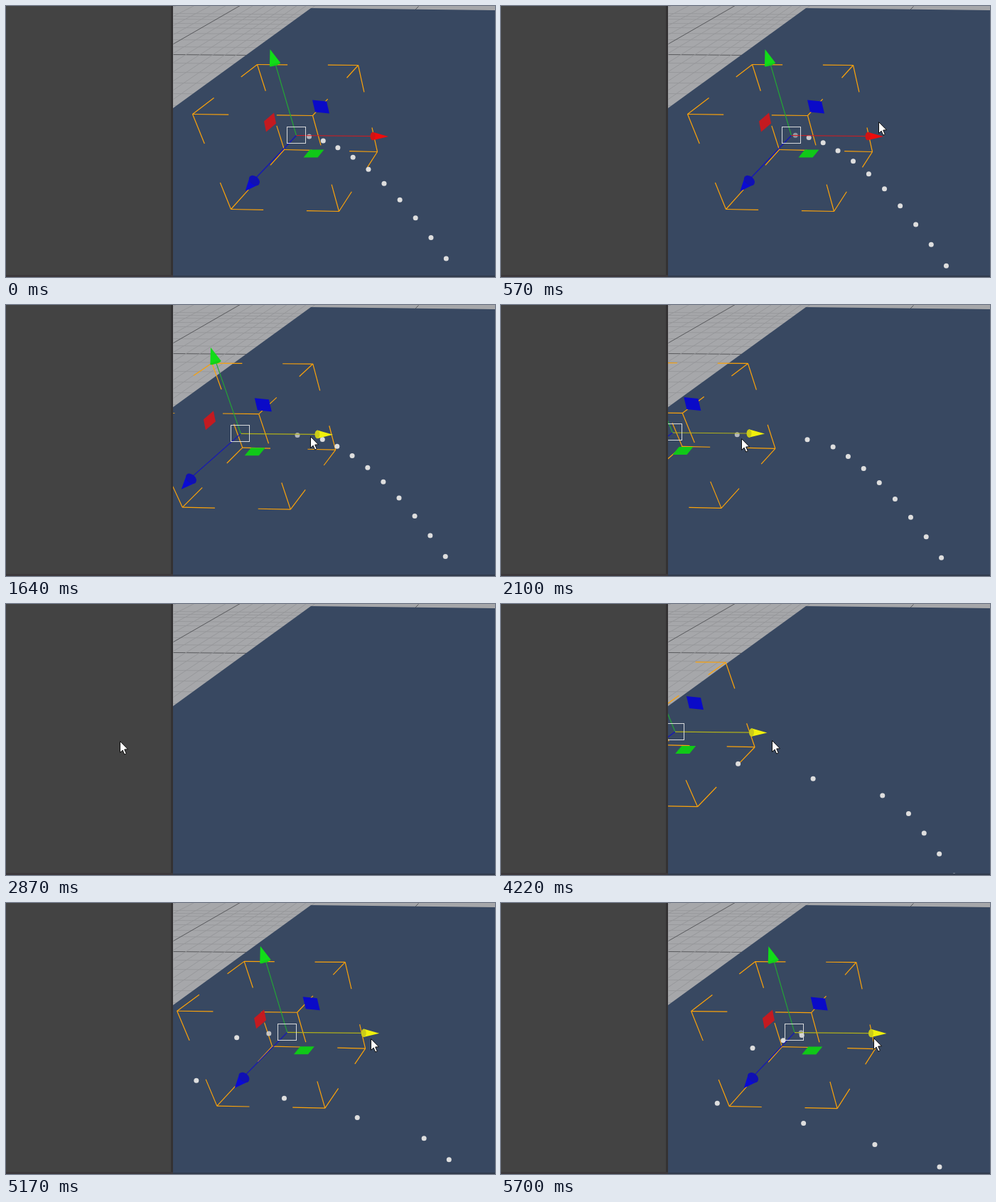
Write an HTML page with a canvas that moves like this. It is 688 px wide and 382 px high and loops after 5730 ms.

```html
<!DOCTYPE html>
<html lang="en">
<head>
<meta charset="utf-8">
<title>Particle emitter</title>
<style>
html, body { margin: 0; width: 100%; height: 100%; overflow: hidden; background: #434343; }
canvas { display: block; width: 688px; height: 382px; }
</style>
</head>
<body>
<canvas id="stage" width="688" height="382"></canvas>
<script>
const ctx = document.getElementById('stage').getContext('2d');
const LOOP = 5730, STEP = 1000 / 24, STEPS = 137;
const HIDE = [2870, 3630];
const GRAB = 24;
const LEAD = 1.6, LAG = 1.5;
const HOME = { x: 408, y: 182 };

// Gizmo x at a few steps: drag out, hold, drag back.
const drag = [[29, 408], [50, 241], [60, 149], [69, 49], [87, 49], [101, 244.5], [103, 274], [116, 358.5], [128, 412.5]];

const clamp = (v, lo, hi) => Math.min(hi, Math.max(lo, v));

// Smooth curve through the points that never overshoots.
function curve(keys, k) {
  const last = keys.length - 1;
  k = clamp(k, keys[0][0], keys[last][0]);
  const secant = i => (keys[i + 1][1] - keys[i][1]) / (keys[i + 1][0] - keys[i][0]);
  const slope = i => {
    const a = secant(Math.max(i - 1, 0)), b = secant(Math.min(i, last - 1));
    return a * b > 0 ? 2 * a * b / (a + b) : 0;
  };
  let i = 0;
  while (i < last - 1 && k > keys[i + 1][0]) i++;
  const h = keys[i + 1][0] - keys[i][0], f = (k - keys[i][0]) / h, g = 1 - f;
  return keys[i][1] * g * g * (1 + 2 * f) + keys[i + 1][1] * f * f * (3 - 2 * f)
    + h * f * g * (g * slope(i) - f * slope(i + 1));
}

const centerX = k => curve(drag, k);
const centerY = x => HOME.y + (x - HOME.x) * .015;

// Simulation clock in emission intervals, and the step of each birth.
const INTERVALS = 13.53;
const drift = p => .1 * Math.sin(2 * Math.PI * p);
const simTime = k => INTERVALS * k / STEPS + drift(k / STEPS) - 3;
const birthStep = n => (n + 3 - drift((n + 3) / INTERVALS)) / INTERVALS * STEPS;

function mouseAt(k) {
  const f = Math.min(1, k / GRAB), g = 1 - f;
  const sink = clamp(.26 * (k - 27), 0, 11) - .06 * Math.max(0, k - 87);
  return [centerX(k + LEAD) + 111 + 56 * g * g, HOME.y + 210 * g * g - 254 * f * g + sink];
}

function line(a, b, color, width = 1.2) {
  ctx.strokeStyle = color;
  ctx.lineWidth = width;
  ctx.beginPath();
  ctx.moveTo(a[0] + .5, a[1] + .5);
  ctx.lineTo(b[0] + .5, b[1] + .5);
  ctx.stroke();
}

function poly(points, color) {
  ctx.fillStyle = color;
  ctx.beginPath();
  points.forEach(p => ctx.lineTo(p[0], p[1]));
  ctx.closePath();
  ctx.fill();
}

function oval([x, y], rx, ry, turn, color) {
  ctx.beginPath();
  ctx.ellipse(x, y, rx, ry, turn, 0, Math.PI * 2);
  ctx.fillStyle = color;
  ctx.fill();
}

function cone([bx, by], [tx, ty], r, flat, color, base) {
  const turn = Math.atan2(ty - by, tx - bx);
  const nx = -Math.sin(turn) * r, ny = Math.cos(turn) * r;
  poly([[bx + nx, by + ny], [tx, ty], [bx - nx, by - ny]], color);
  oval([bx, by], r * flat, r, turn, base);
}

// Parallelogram from its centre and two half sides.
const tile = ([x, y], [ax, ay], [bx, by], color) => poly([
  [x - ax - bx, y - ay - by], [x + ax - bx, y + ay - by],
  [x + ax + bx, y + ay + by], [x - ax + bx, y - ay + by]], color);

function rect(x, y, w, h, color) {
  ctx.fillStyle = color;
  ctx.fillRect(x, y, w, h);
}

function drawGround() {
  rect(235, 0, 453, 382, '#a6a7aa');
  for (let i = -8; i < 6; i++) {
    const y = Math.round(68 + 11.6 * i + .55 * i * i);
    line([235, y], [688, y + 4], i ? '#98999c' : '#58595c', 1);
  }
  for (let i = -4; i < 8; i++) {
    const y = 53 + 13 * i, slope = .576 + (y - 53) * .00166;
    line([235, y], [435, y - 200 * slope], i ? '#96979a' : '#58595c', 1);
  }
  line([574, 6], [580, 0], '#58595c', 1);
  poly([[429, 3], [688, 6], [688, 382], [235, 382], [235, 144]], '#384861');
}

function drawPanel() {
  rect(0, 0, 235, 382, '#434343');
  rect(232, 0, 3, 382, '#343233');
  rect(0, 379, 235, 3, '#3c383b');
  rect(235, 380, 453, 2, '#303a4c');
}

function drawParticles(s) {
  for (let n = Math.ceil(s - 12); n <= s - .2; n++) {
    const u = s - n, depth = 1 + .0015 * u * u;
    const x0 = centerX(birthStep(n) + LEAD);
    const x = HOME.x + (x0 - HOME.x + 18 * u + .63 * u * u) / depth;
    const y = centerY(x0) + 2 * u * u / depth;
    ctx.globalAlpha = Math.min(1, .42 + .33 * u);
    oval([x, y], 3.5, 3.5, 0, '#dedede');
  }
  ctx.globalAlpha = 1;
}

// Box edges that run along x: top back, top front, low back, low front.
const edges = [
  [[353, 82], [495, 83]],
  [[262, 152], [431, 154]],
  [[391, 202], [522, 205]],
  [[316, 286], [468, 289]]
];

function drawBrackets(x) {
  const d = (x - HOME.x) / 148;
  const mix = (a, b, f) => a.map((v, j) => v + (b[j] - v) * f);
  const pair = (a, b, f, g) => {
    line(a, mix(a, b, f), '#fca30a');
    line(b, mix(b, a, g), '#fca30a');
  };
  const [left, right] = [0, 1].map(i => edges.map(([a, b]) => mix(a, b, i + d)));
  left.forEach((p, i) => pair(p, right[i], .3, .3));
  for (const [tb, tf, lb, lf] of [left, right]) {
    pair(tb, tf, .25, .33);
    pair(lb, lf, .26, .33);
    pair(tb, lb, .31, .28);
    pair(tf, lf, .31, .28);
  }
}

function drawGizmo(cx, active) {
  const dx = cx - HOME.x, cy = centerY(cx);
  // lean: how far a point tilts as the gizmo crosses the view
  const place = (x, y, lean = 0) => [x + dx * (1 + lean), cy + y - HOME.y];
  const mid = place(408, 182);

  tile(place(371.5, 164, .09), [7, -6], [1.5, 7.5], '#c41a20');
  tile(place(443, 142, .04), [10, 1], [2, 8.5], '#0a0ac8');
  tile(place(433, 208, .06), [10, 0], [-4.5, 5.5], '#10c818');

  line(mid, place(379, 83, .07), '#24a436');
  cone(place(378.5, 82.5, .07), place(371.5, 61, .07), 8, .2, '#12dc18', '#12d018');

  line(mid, place(350, 243, .14), '#1414bc');
  cone(place(349.5, 246, .14), place(336.5, 261, .15), 8.5, .7, '#0a0ad4', '#1010b4');

  line(mid, place(515, 183), active ? '#b0b01a' : '#d8181c');
  cone(place(516, 183.5), place(538, 184), 5.8, .6, active ? '#f0f00c' : '#ee0c0c', active ? '#cbcb18' : '#d01414');

  ctx.strokeStyle = '#d8dadc';
  ctx.lineWidth = 1;
  ctx.strokeRect(Math.floor(cx) - 12.5, Math.round(cy) - 11.5, 26, 23);
}

function drawMouse([x, y]) {
  ctx.save();
  ctx.translate(Math.round(x) + .5, Math.round(y) + .5);
  ctx.beginPath();
  [[0, 0], [0, 16], [3.6, 12.6], [6.2, 18.6], [8.8, 17.5], [6.2, 11.5], [11, 11.3]]
    .forEach(p => ctx.lineTo(...p));
  ctx.closePath();
  ctx.fillStyle = '#fff';
  ctx.fill();
  ctx.strokeStyle = '#111';
  ctx.lineWidth = 1;
  ctx.stroke();
  ctx.restore();
}

function draw(t) {
  const k = Math.floor((t + 12) / STEP);
  drawGround();
  if (t < HIDE[0] || t >= HIDE[1]) {
    ctx.save();
    ctx.beginPath();
    ctx.rect(235, 0, 453, 382);
    ctx.clip();
    drawBrackets(centerX(k - LAG));
    drawParticles(simTime(k));
    drawGizmo(centerX(k), k >= GRAB);
    ctx.restore();
  }
  drawPanel();
  drawMouse(mouseAt(k));
}

const start = performance.now();
function tick() {
  draw((performance.now() - start) % LOOP);
  requestAnimationFrame(tick);
}
tick();
</script>
</body>
</html>
```
